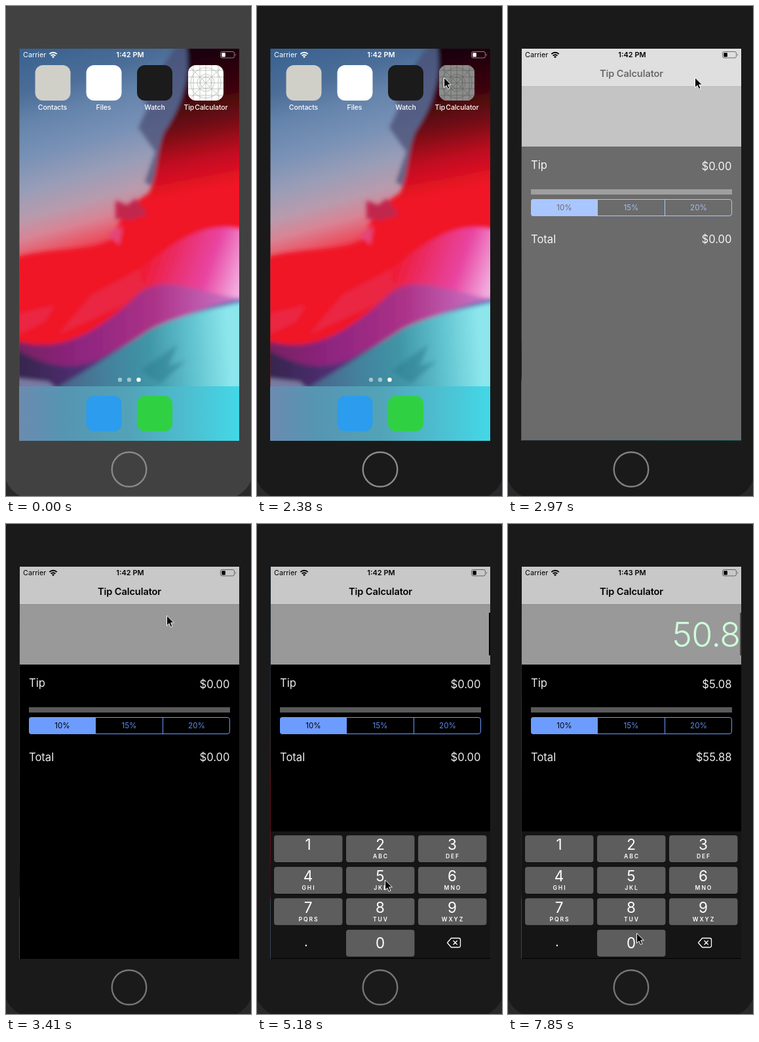
Write an HTML page that moves like this. It is 374x746 px and loops after 8000 ms.

```html
<!DOCTYPE html>
<html lang="en">
<head>
<meta charset="utf-8">
<title>Tip Calculator</title>
<style>
html, body { margin: 0; width: 100%; height: 100%; overflow: hidden; background: #29292c; }
#stage { position: relative; width: 374px; height: 746px; overflow: hidden; --step: 0; }
#stage > svg { position: absolute; left: 0; top: 0; }
text { font-family: Inter, "Liberation Sans", sans-serif; }
.mid { text-anchor: middle; }
.end { text-anchor: end; }
.screen { position: absolute; left: 21px; top: 65px; width: 335px; height: 596px; overflow: hidden; }

/* One percent of every keyframe rule is one step of the clock. */
.anim { animation: 100s linear infinite paused; animation-delay: calc(var(--step) * -1s); }

#bezel { animation-name: bezel; }
@keyframes bezel { 0%, 1.9% { fill: #414141; } 2%, 100% { fill: #1a1a1a; } }

#ring { animation-name: ring; }
@keyframes ring {
  0%, 1.9% { stroke: #888; }
  2%, 11% { stroke: #707070; }
  16%, 18% { stroke: #8a8a8a; }
  22%, 100% { stroke: #757575; }
}

#icons { animation-name: recede; transform-origin: 188.5px 366px; }
@keyframes recede { 0%, 17% { transform: none; } 18% { transform: scale(.965); } 19%, 100% { transform: scale(.95); } }

#dock { animation-name: dock; }
@keyframes dock { 0%, 17% { transform: none; } 18%, 100% { transform: translateY(-8px); } }

#dim { animation-name: dim; }
@keyframes dim { 0%, 17% { opacity: 0; } 18% { opacity: .51; } 20% { opacity: .65; } 23%, 100% { opacity: 1; } }

#press { animation-name: press; }
@keyframes press { 0%, 15.9% { opacity: 0; } 16%, 100% { opacity: .45; } }

#app { position: absolute; overflow: hidden; background: #fff; animation-name: open; }
@keyframes open {
  0%, 17.9% { left: 257px; top: 25px; width: 54px; height: 54px; border-radius: 12px; opacity: 0; }
  18% { left: 80px; top: 32px; width: 247.5px; height: 379.5px; border-radius: 19px; opacity: 1; }
  19% { left: 8px; top: 3px; width: 319px; height: 564px; border-radius: 8px; }
  20%, 100% { left: 0; top: 0; width: 335px; height: 596px; border-radius: 0; opacity: 1; }
}
#page { display: block; transform-origin: 0 0; animation-name: grow; }
@keyframes grow { 0%, 18% { transform: scale(.74); } 19% { transform: scale(.952); } 20%, 100% { transform: none; } }

#veil { animation-name: veil; }
@keyframes veil { 0%, 19% { opacity: 1; } 20% { opacity: .42; } 21% { opacity: .15; } 22% { opacity: .03; } 23%, 100% { opacity: 0; } }

#board { animation-name: rise; }
@keyframes rise {
  0%, 27% { transform: translateY(200px); }
  28% { transform: translateY(140px); }
  29% { transform: translateY(32.5px); }
  30% { transform: translateY(6px); }
  31%, 100% { transform: none; }
}

#caret { animation-name: blink; }
@keyframes blink {
  0%, 27% { opacity: 0; }
  28%, 31% { opacity: 1; }
  32%, 34% { opacity: 0; }
  35%, 51% { opacity: 1; }
  53%, 100% { opacity: .5; }
}

#cursor { animation-name: point; }
@keyframes point {
  0%, 8.9% { transform: translate(47px, 194px); opacity: 0; }
  9% { transform: translate(47px, 194px); opacity: 1; }
  10% { transform: translate(66px, 168px); }
  12% { transform: translate(215px, 84px); }
  14%, 22% { transform: translate(285px, 109px); }
  24% { transform: translate(205px, 170px); }
  25% { transform: translate(173px, 189px); }
  26%, 29% { transform: translate(173px, 182px); }
  34% { transform: translate(194px, 538px); }
  35%, 37% { transform: translate(195px, 542px); }
  41%, 42% { transform: translate(143px, 636px); }
  43%, 45% { transform: translate(98px, 623px); }
  49%, 51% { transform: translate(199px, 586px); }
  53%, 100% { transform: translate(196px, 623px); opacity: 1; }
}
</style>
</head>
<body>
<div id="stage">
  <svg width="374" height="746">
    <defs>
      <linearGradient id="sky" gradientUnits="userSpaceOnUse" x1="80" y1="50" x2="170" y2="370">
        <stop offset="0" stop-color="#386190"/><stop offset=".2" stop-color="#4c6e98"/>
        <stop offset=".32" stop-color="#6483ab"/><stop offset=".48" stop-color="#7891b6"/>
        <stop offset=".63" stop-color="#999db7"/><stop offset=".75" stop-color="#b89bad"/>
        <stop offset=".84" stop-color="#d88495"/><stop offset=".92" stop-color="#e95767"/>
        <stop offset="1" stop-color="#ef2538"/>
      </linearGradient>
      <linearGradient id="red" gradientUnits="userSpaceOnUse" x1="295" y1="70" x2="335" y2="275">
        <stop offset="0" stop-color="#1a0307"/><stop offset=".3" stop-color="#3c060d"/>
        <stop offset=".52" stop-color="#6e0914"/><stop offset=".75" stop-color="#bd0e20"/>
        <stop offset="1" stop-color="#f01425"/>
      </linearGradient>
      <linearGradient id="pink" gradientUnits="userSpaceOnUse" x1="215" y1="375" x2="356" y2="425">
        <stop offset="0" stop-color="#f01a30"/><stop offset=".3" stop-color="#ea2d68"/>
        <stop offset=".65" stop-color="#e845a2"/><stop offset="1" stop-color="#f3aee0"/>
      </linearGradient>
      <linearGradient id="plum">
        <stop offset="0" stop-color="#75205f"/><stop offset=".3" stop-color="#8f2580"/>
        <stop offset=".6" stop-color="#ab3187"/><stop offset="1" stop-color="#d07fd0"/>
      </linearGradient>
      <linearGradient id="navy">
        <stop offset="0" stop-color="#33244a"/><stop offset=".35" stop-color="#55317c"/>
        <stop offset=".7" stop-color="#65419c"/><stop offset="1" stop-color="#5a78b8"/>
      </linearGradient>
      <linearGradient id="teal" gradientUnits="userSpaceOnUse" x1="70" y1="540" x2="340" y2="520">
        <stop offset="0" stop-color="#4a5f86"/><stop offset=".3" stop-color="#44809c"/>
        <stop offset=".55" stop-color="#3f95a6"/><stop offset=".8" stop-color="#62c4d0"/>
        <stop offset="1" stop-color="#8ce6ec"/>
      </linearGradient>
      <linearGradient id="shelf">
        <stop offset="0" stop-color="#6b8bb0"/><stop offset=".2" stop-color="#5695b2"/>
        <stop offset=".5" stop-color="#52a3b8"/><stop offset=".78" stop-color="#4cc0d1"/>
        <stop offset="1" stop-color="#43d8e8"/>
      </linearGradient>
      <filter id="soft" x="-20%" y="-20%" width="140%" height="140%"><feGaussianBlur stdDeviation="3"/></filter>
      <clipPath id="glass"><rect x="20.5" y="65" width="335.5" height="596.5"/></clipPath>

      <g id="status" fill="currentColor">
        <text x="26" y="78" font-size="10.8">Carrier</text>
        <g fill="none" stroke="currentColor" stroke-width="1.9">
          <path d="M66.3 73.2a8 8 0 0 1 11.4 0M68.6 75.7a4.8 4.8 0 0 1 6.8 0"/>
        </g>
        <path d="M72 79.3l-2-2.1a2.9 2.9 0 0 1 4 0z"/>
        <text id="time" class="mid" x="189.5" y="78" font-size="11" font-weight="600">1:42 PM</text>
        <rect x="327.5" y="69.5" width="21" height="9.5" rx="2.5" fill="none" stroke="currentColor" opacity=".5"/>
        <rect x="329.3" y="71.2" width="5.6" height="6.2" rx="1"/>
        <path d="M350 72.5q2 1.8 0 3.6z" opacity=".5"/>
      </g>
    </defs>

    <rect id="bezel" class="anim" x="-3" y="-25" width="380" height="776" rx="45"/>
    <circle id="ring" class="anim" cx="188" cy="705.5" r="26.3" fill="none" stroke-width="2.4"/>

    <g clip-path="url(#glass)">
      <rect x="20" y="65" width="336" height="597" fill="url(#sky)"/>
      <g filter="url(#soft)">
        <path fill="#464b70" opacity=".7" d="M205 125L240 90 265 55H300L285 130 250 215 232 280 212 268 228 222 202 185 216 155Z"/>
        <path fill="url(#red)" d="M10 384C70 366 130 376 164 354 172 322 190 302 218 285 233 255 230 220 242 192 264 160 285 115 275 55H366V465L10 550Z"/>
        <path fill="#c1264e" d="M167 296L185 303 198 293 217 318 190 326 167 324Z"/>
        <path fill="#e4457a" d="M156 348L178 335 173 364Z"/>
        <path fill="#e8304f" opacity=".7" d="M20 468L75 455 60 480 20 500ZM130 440L215 395 290 385 180 455 80 500Z"/>
        <path fill="url(#pink)" d="M205 400C250 365 300 322 366 342V458C300 455 250 440 205 420Z"/>
        <path fill="url(#plum)" d="M10 508C90 535 150 485 195 445 235 400 290 438 366 446V470C280 470 200 515 130 555L10 565Z"/>
        <path fill="url(#navy)" d="M10 520C60 550 100 556 140 538 200 508 270 462 366 444V485L200 548 90 595H10Z"/>
        <path fill="url(#teal)" d="M45 600C120 558 170 525 221 492 270 468 320 460 366 450V600Z"/>
        <path fill="#2f7f92" opacity=".55" d="M205 555L262 515 248 548 275 540 235 575Z"/>
        <path fill="#7a7aa2" d="M10 566L65 572 85 590H10Z"/>
      </g>
      <rect id="dock" class="anim" x="20" y="579" width="336" height="100" fill="url(#shelf)"/>
      <g id="icons" class="anim">
        <rect x="44.5" y="90" width="54" height="54" rx="12" fill="#d0cfc8"/>
        <rect x="122.5" y="90" width="54" height="54" rx="12" fill="#fff"/>
        <rect x="200" y="90" width="54" height="54" rx="12" fill="#1b1b1b"/>
        <rect x="278" y="90" width="54" height="54" rx="12" fill="#fff"/>
        <g fill="none" stroke="#a9b0aa" stroke-width=".7">
          <path d="M278 117h54M305 90v54M282 94l46 46M328 94l-46 46M278 108h54M278 126h54M296 90v54M314 90v54M278 98h54M278 136h54M286 90v54M324 90v54"/>
          <circle cx="305" cy="117" r="8.5"/><circle cx="305" cy="117" r="13"/><circle cx="305" cy="117" r="23"/>
        </g>
        <rect id="press" class="anim" x="278" y="90" width="54" height="54" rx="12"/>
        <g class="mid" fill="#fff" font-size="10.5" font-weight="500" letter-spacing="-.1" word-spacing="-1.6">
          <text x="71" y="158">Contacts</text><text x="149" y="158">Files</text>
          <text x="227" y="158">Watch</text><text x="305" y="158">Tip Calculator</text>
        </g>
        <g fill="#fff">
          <circle cx="174" cy="569" r="3.2" opacity=".5"/><circle cx="188" cy="569" r="3.2" opacity=".5"/>
          <circle cx="202.5" cy="569" r="3.2"/>
        </g>
        <rect x="122.5" y="593.5" width="54" height="54" rx="12" fill="#2b9cee"/>
        <rect x="200" y="593.5" width="54" height="54" rx="12" fill="#2fd143"/>
      </g>
      <use href="#status" color="#fff"/>
      <rect id="dim" class="anim" x="20" y="65" width="336" height="597"/>
    </g>
  </svg>

  <div class="screen">
    <div id="app" class="anim">
      <svg id="page" class="anim" width="335" height="596" viewBox="21 65 335 596">
        <rect x="21" y="65" width="335" height="596"/>
        <rect x="21" y="65" width="335" height="57" fill="#c8c8c8"/>
        <rect x="21" y="122" width="335" height="92" fill="#999"/>
        <rect x="21" y="122" width="335" height="1" fill="#8c8c8c"/>
        <text class="mid" x="188.5" y="108" font-size="14.6" font-weight="600" letter-spacing="-.1">Tip Calculator</text>
        <text id="amount" class="end" x="354.5" y="187" font-size="52" font-weight="300" letter-spacing="-.6" fill="#ccffd9"></text>
        <rect id="caret" class="anim" x="354" y="135" width="2" height="65"/>
        <g fill="#ececec" font-size="16.6">
          <text x="35" y="248">Tip</text><text id="tip" class="end" x="341.5" y="250.3"></text>
          <text x="35" y="361">Total</text><text id="total" class="end" x="341.5" y="361"></text>
        </g>
        <rect x="35" y="279" width="307" height="8" fill="#5a5a5a"/>
        <path d="M39 294H137V320H39a4 4 0 0 1-4-4V298a4 4 0 0 1 4-4Z" fill="#6d9cff"/>
        <g fill="none" stroke="#6d9cff">
          <rect x="35.5" y="294.5" width="306" height="25" rx="3.5"/><path d="M136.5 294v26M239.5 294v26"/>
        </g>
        <g class="mid" font-size="11.6" fill="#5f8ce8">
          <text x="86" y="311.2" fill="#000">10%</text><text x="188" y="311.2">15%</text><text x="291" y="311.2">20%</text>
        </g>
        <g id="board" class="anim">
          <rect x="21" y="468" width="335" height="193" fill="#151515"/>
          <g id="keys" class="mid" fill="#fff"></g>
          <text class="mid" x="75" y="643" font-size="20" fill="#fff">.</text>
          <path d="M296.5 630.5H308a2.5 2.5 0 0 1 2.5 2.5V642a2.5 2.5 0 0 1-2.5 2.5H296.5L290.5 637.5ZM299.5 634.3l6.2 6.2M305.7 634.3l-6.2 6.2" fill="none" stroke="#fff" stroke-width="1.3" stroke-linejoin="round"/>
        </g>
        <rect id="veil" class="anim" x="21" y="65" width="335" height="596" fill="#fff"/>
        <use href="#status" color="#000"/>
      </svg>
    </div>
  </div>

  <svg width="374" height="746">
    <path id="cursor" class="anim" d="M.5 0V15.2l3.5-3.3 2.4 5.5 2.6-1.1-2.4-5.4h4.8z" stroke="#fff" stroke-width="1"/>
  </svg>
</div>

<script>
const $ = id => document.getElementById(id);
const LOOP = 8000, STEP = 147.8, LAST = 53;
const letters = ["", "", "ABC", "DEF", "GHI", "JKL", "MNO", "PQRS", "TUV", "WXYZ"];
const entries = [[0, ""], [36, "5"], [41, "50"], [44, "50."], [50, "50.8"]];
const presses = { 36: 5, 41: 0, 50: 8 };

function key(digit) {
  const slot = digit ? digit - 1 : 10;
  const x = 26 + slot % 3 * 110, y = 474 + Math.floor(slot / 3) * 47.9;
  const box = dy => `<rect x="${x}" y="${y + dy}" width="104.5" height="41" rx="4"`;
  return box(1) + ' fill="#0a0a0a"/>' + box(0) + ` id="key${digit}"/>` +
    `<text x="${x + 52}" y="${y + (digit ? 22 : 28)}" font-size="22.5">${digit}</text>` +
    `<text x="${x + 53}" y="${y + 35}" font-size="8.6" font-weight="600" letter-spacing="1.9">${letters[digit]}</text>`;
}
$("keys").innerHTML = letters.map((_, digit) => key(digit)).join("");

function show(step) {
  $("stage").style.setProperty("--step", step);
  const typed = entries.filter(e => e[0] <= step).pop()[1];
  const bill = Number(typed);
  $("amount").textContent = typed;
  $("tip").textContent = "$" + (bill * .1).toFixed(2);
  $("total").textContent = "$" + (bill * 1.1).toFixed(2);
  $("time").textContent = step < 47 ? "1:42 PM" : "1:43 PM";
  letters.forEach((_, d) => $("key" + d).setAttribute("fill", presses[step] === d ? "#383838" : "#5d5d5d"));
}

let shown = -1;
function tick() {
  const step = Math.min(LAST, Math.floor(performance.now() % LOOP / STEP));
  if (step !== shown) show(shown = step);
  requestAnimationFrame(tick);
}
tick();
</script>
</body>
</html>
```
